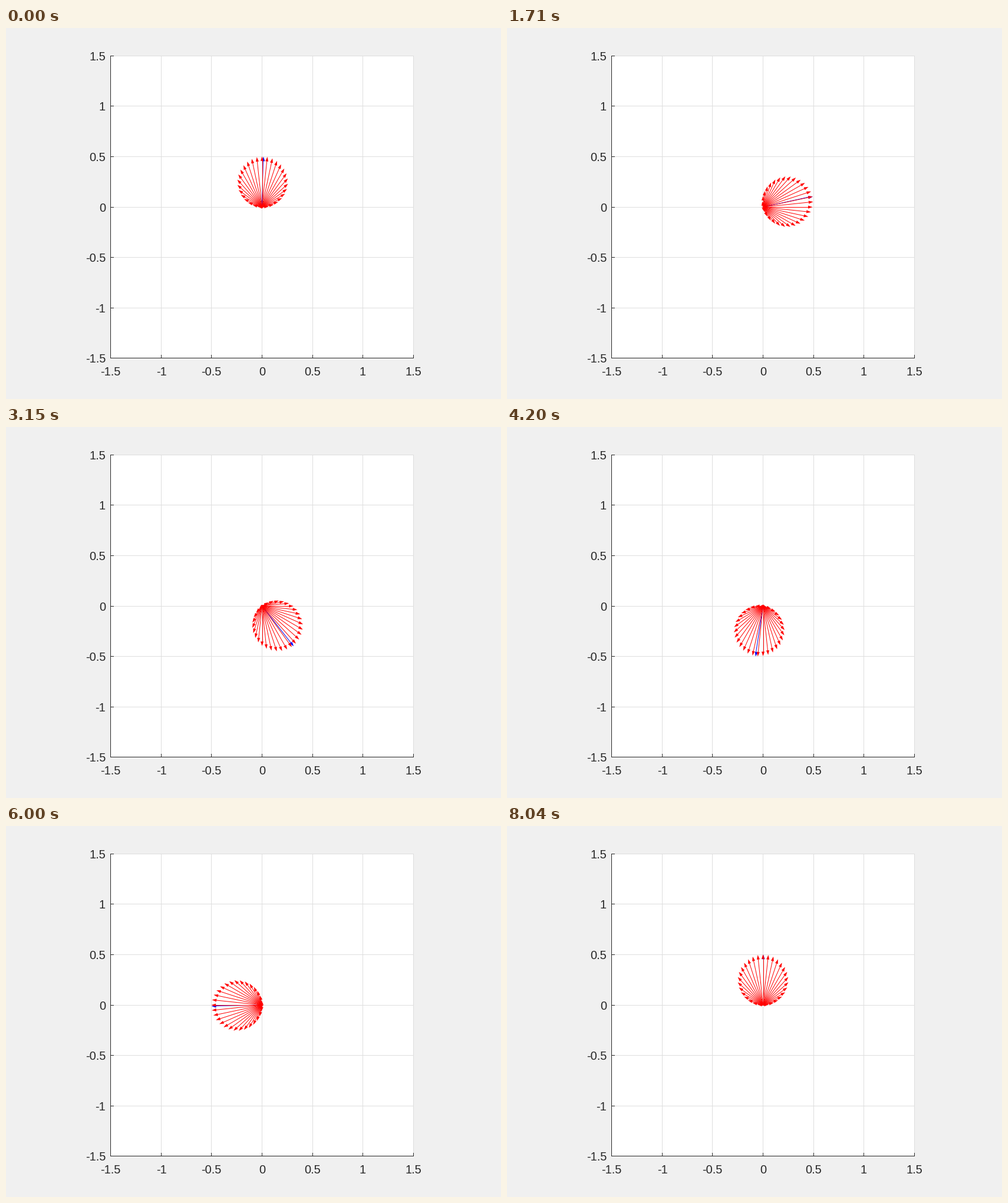
Recreate the animation shown at these times as a matplotlib script. Size 840 by 630 pixels, loop 8.07 s.

```python
import numpy as np
import matplotlib.pyplot as plt
from matplotlib.animation import FuncAnimation
from matplotlib.collections import LineCollection, PolyCollection
from matplotlib.patches import Rectangle

W, H, DPI = 840, 630, 100
PX = 72 / DPI                 # points per pixel
FRAMES, INTERVAL = 269, 30

CX, CY = 434.5, 304.1         # data origin in pixels
HALF = 85.58                  # pixels per 0.5 data units
HEAD_LEN, HEAD_WIDTH = 7.0, 4.6

INK, GRID, PAPER, BACK = "#262626", "#dedede", "#ffffff", "#f0f0f0"

fig = plt.figure(figsize=(W / DPI, H / DPI), dpi=DPI, facecolor=BACK)
ax = fig.add_axes([0, 0, 1, 1])
ax.set_xlim(0, W)
ax.set_ylim(H, 0)
ax.axis("off")


def bar(x, y, w, h, color, z):
    ax.add_patch(Rectangle((x, y), w, h, fc=color, lw=0, zorder=z,
                           antialiased=False))


def label(x, y, text, align):
    ax.text(x, y, text, family="Liberation Sans", size=20 * PX, color=INK,
            ha=align, va="baseline")


def draw_axes():
    steps = range(-3, 4)
    xs = [int(CX + k * HALF) for k in steps]
    ys = [int(CY - k * HALF + 0.01) for k in steps]
    left, right, bottom, top = xs[0], xs[-1], ys[0], ys[-1]
    width, height = right - left + 1, bottom - top + 1

    bar(left, top, width, height, PAPER, 0)
    for k, x, y in zip(steps, xs, ys):
        bar(x, top, 1, height, GRID, 1)
        bar(left, y, width, 1, GRID, 1)
        bar(x, bottom - 5, 1, 6, INK, 2)
        bar(left, y, 6, 1, INK, 2)
        text = f"{k / 2:g}"
        label(x + 0.5, 590, text, "center")
        label(169, y + 8.3, text, "right")
    bar(left, top, 1, height, INK, 2)
    bar(left, bottom, width, 1, INK, 2)


class Arrows:
    """Arrows from the origin with small solid heads."""

    def __init__(self, color, z):
        self.shafts = LineCollection([], colors=color, linewidths=PX,
                                     capstyle="butt", zorder=z)
        self.heads = PolyCollection([], facecolors=color, edgecolors=color,
                                    linewidths=0.3 * PX, zorder=z)
        ax.add_collection(self.shafts, autolim=False)
        ax.add_collection(self.heads, autolim=False)

    def set(self, vectors):
        origin = np.array([CX, CY])
        shafts, heads = [], []
        for v in vectors:
            size = np.hypot(*v)
            if size < 0.3:
                continue
            u = v / size
            side = np.array([-u[1], u[0]]) * HEAD_WIDTH / 2
            tip = origin + v
            back = tip - u * min(HEAD_LEN, size)
            shafts.append([origin, (tip + back) / 2])
            heads.append([tip, back + side, back - side])
        self.shafts.set_segments(shafts)
        self.heads.set_verts(heads)


def heading(angle):
    """Unit vector for a clockwise angle from straight up."""
    return np.stack([np.sin(angle), -np.cos(angle)], axis=-1)


draw_axes()
resultant = Arrows("#0000ff", 3)
parts = Arrows("#ff0000", 4)
axes_angles = np.arange(30) * np.pi / 30


def update(i):
    theta = 2 * np.pi * (i + 1) / FRAMES
    resultant.set([HALF * heading(theta)])
    # each part is the projection of the turning vector on a fixed axis
    reach = HALF * np.cos(theta - axes_angles)
    parts.set(reach[:, None] * heading(axes_angles))
    return []


anim = FuncAnimation(fig, update, frames=FRAMES, interval=INTERVAL,
                     init_func=lambda: update(0), repeat=True,
                     repeat_delay=0, blit=False)
plt.show()
```
